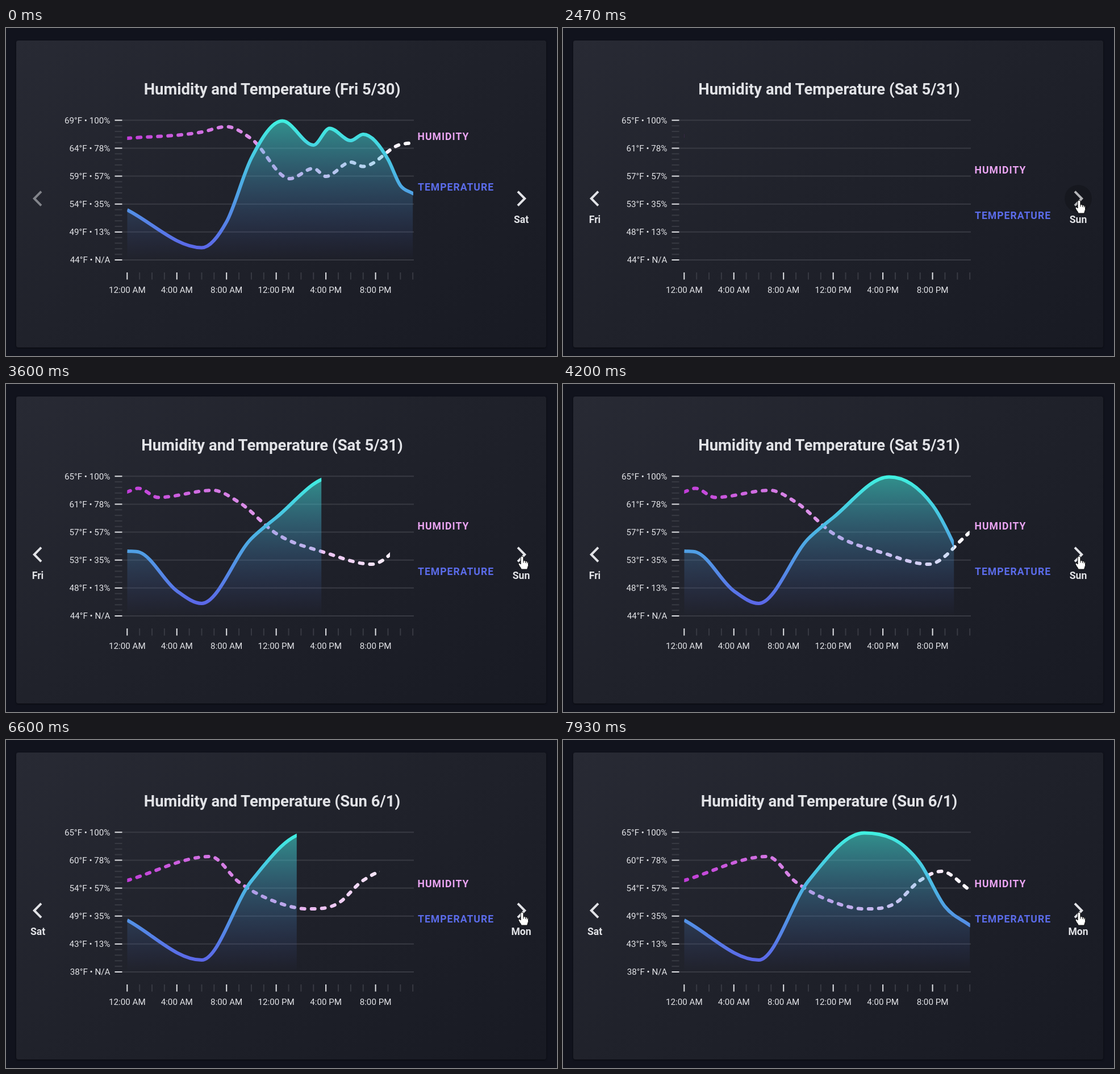
Animation of 970 by 577 pixels, one loop 8 s. Source, as an HTML page:

```html
<!DOCTYPE html>
<html lang="en">
<head>
<meta charset="utf-8">
<title>Humidity and Temperature</title>
<style>
  html, body { margin: 0; width: 100%; height: 100%; overflow: hidden; background: #11131d; }
  .card { position: absolute; left: 18px; top: 22px; width: 933px; height: 540px; border-radius: 4px;
    background: linear-gradient(145deg, #282a34, #20222b 45%, #181a23); box-shadow: 0 1px 3px #0008; }
  svg { position: absolute; left: 0; top: 0; width: 970px; height: 577px;
    font-family: Roboto, sans-serif; fill: #e2e3e7; }
  .title { font-size: 27.5px; font-weight: 700; text-anchor: middle; }
  .axis { font-size: 15.2px; }
  .series { font-size: 17.6px; font-weight: 700; letter-spacing: 1px; }
  .nav { font-size: 17.6px; font-weight: 700; text-anchor: middle; }
  .major { stroke: #e2e3e7; stroke-width: 2; }
  .minor { stroke: #383a43; stroke-width: 2; }
  .chevron { fill: none; stroke: #e2e3e7; stroke-width: 4; }
</style>
</head>
<body>
<div class="card"></div>
<svg viewBox="0 0 970 577">
  <defs>
    <linearGradient id="pink" gradientUnits="userSpaceOnUse" x1="213" x2="717" y1="0" y2="0">
      <stop stop-color="#c13cd8"/><stop offset="1" stop-color="#fff"/>
    </linearGradient>
    <linearGradient id="blue" gradientUnits="userSpaceOnUse" x1="0" x2="0" y1="162" y2="388">
      <stop stop-color="#40f0e0"/><stop offset="1" stop-color="#5b67e8"/>
    </linearGradient>
    <linearGradient id="haze" gradientUnits="userSpaceOnUse" x1="0" x2="0" y1="162" y2="408">
      <stop stop-color="#40f0e0" stop-opacity=".54"/><stop offset="1" stop-color="#5b67e8" stop-opacity="0"/>
    </linearGradient>
    <clipPath id="humidClip"><rect id="humidRect" x="213.3" y="150" height="262"/></clipPath>
    <clipPath id="tempClip"><rect id="tempRect" x="213.3" y="150" height="262"/></clipPath>
  </defs>
  <g id="axes"></g>
  <g id="chart"></g>
  <path class="chevron" d="M901 287.7L913.2 300L901 312.3"/>
  <circle id="ripple" cx="907" cy="300" r="24" fill="#000"/>
  <g id="cursor" fill="#fff" stroke="#111" stroke-width="1" stroke-linejoin="round">
    <path id="arrow" d="M0 0V17L4 13.2L6.6 19.2L9.4 18L6.8 12.2H12.2Z"/>
    <g id="hand">
      <path d="M-2.4 2.2Q-2.2 0 0 0T2.4 2.2V8Q4.2 7 6 8.6Q7.6 8 8.8 9.6Q11 9.4 11 12V16.5L9 23H-1.2Q-2 20.5 -4.4 17.6L-6.4 14Q-6.6 11.8 -4.6 12Q-3.4 12.4 -2.4 14Z"/>
      <path d="M2.4 8V11.5M6 8.6V12M8.8 9.6V12.5" fill="none"/>
    </g>
  </g>
</svg>
<script>
const LOOP = 8000, FRAME = 1000 / 15, DRAW = 2000, TEMP_DELAY = 503;
const LEFT = 213.3, HOUR = 21.865, TOP = 162.3, BOTTOM = 408, WIDTH = 503.6;
const $ = id => document.getElementById(id);

// Curves are given by their turning points as [hour, y]; "from" is the click, "start" the first stroke.
const days = [
  { from: 0, start: -LOOP, date: "Fri 5/30", next: "Sat", high: 69, low: 44,
    humid: [[0, 194], [6, 183], [8, 173.5], [10, 195], [13.1, 265], [15, 247],
      [16, 261], [18, 236], [19, 243.5], [22, 205], [23, 202]],
    temp: [[0, 320], [6, 386.5], [8, 341], [10, 229], [12.5, 163.5], [15, 206],
      [16.3, 176.5], [18, 198], [19, 187], [21, 231], [22, 277], [23, 291]] },
  { from: 2467, start: 2467, date: "Sat 5/31", prev: "Fri", next: "Sun", high: 65.4, low: 43.9,
    humid: [[0, 190], [0.9, 183.5], [2.5, 199.5], [6.9, 187], [9, 208], [12, 263],
      [16, 297], [19.7, 317], [23, 261]],
    temp: [[0, 294], [1, 296], [4, 364], [6, 386], [10, 272], [12, 235],
      [16.5, 163.5], [20, 213], [23, 341]] },
  { from: 5533, start: 5580, date: "Sun 6/1", prev: "Sat", next: "Mon", high: 65, low: 38,
    humid: [[0, 247], [6.7, 205], [9, 250], [12, 285], [14.5, 297], [17, 287],
      [19, 247], [20.7, 231], [23, 264]],
    temp: [[0, 317], [6, 387], [10, 248], [14.5, 163.5], [19, 217], [21, 293], [23, 326]] },
];

const mix = (a, b, f) => a + (b - a) * f;
const clamp = x => Math.max(0, Math.min(1, x));
const easeOut = x => 1 - (1 - clamp(x)) ** 3;
const gridY = k => mix(TOP, BOTTOM, k / 5);
const line = (x1, y1, x2, y2, cls) => `<path class="${cls}" d="M${x1} ${y1}L${x2} ${y2}"/>`;
const text = (x, y, str, cls, attrs = "") => `<text x="${x}" y="${y}" class="${cls}" ${attrs}>${str}</text>`;

function drawAxes() {
  let out = "";
  for (let i = 0; i <= 25; i++) {
    const y = gridY(i / 5), major = i % 5 === 0;
    if (major) out += line(204.5, y, 718, y, "minor");
    out += line(191.5, y, 204.5, y, major ? "major" : "minor");
  }
  for (let hour = 0; hour < 24; hour++) {
    const x = LEFT + hour * HOUR, major = hour % 4 === 0;
    out += line(x, 430, x, 442.5, major ? "major" : "minor");
    const label = `${hour % 12 || 12}:00 ${hour < 12 ? "AM" : "PM"}`;
    if (major) out += text(x, 466, label, "axis", 'text-anchor="middle"');
  }
  return out;
}

// Cubic curve through the points, level at every peak and valley.
function curve(points) {
  const last = points.length - 1;
  const span = i => points[i + 1][0] - points[i][0];
  const slope = i => (points[i + 1][1] - points[i][1]) / span(i);
  const tangent = i => {
    if (i === 0) return slope(0);
    if (i === last) return slope(last - 1);
    const before = slope(i - 1), after = slope(i);
    return before * after <= 0 ? 0
      : (before * span(i) + after * span(i - 1)) / (span(i) + span(i - 1));
  };
  const at = (hour, y) => `${LEFT + hour * HOUR} ${y} `;
  let d = "M" + at(...points[0]);
  for (let i = 0; i < last; i++) {
    const [h0, y0] = points[i], [h1, y1] = points[i + 1], third = span(i) / 3;
    d += "C" + at(h0 + third, y0 + tangent(i) * third)
      + at(h1 - third, y1 - tangent(i + 1) * third) + at(h1, y1);
  }
  return d;
}

function drawScale({ high, low }) {
  let out = "";
  for (let k = 0; k <= 5; k++) {
    const percent = k < 5 ? Math.round(100 - 21.7 * k) + "%" : "N/A";
    const label = `${Math.round(mix(high, low, k / 5))}°F • ${percent}`;
    out += text(183.5, gridY(k) + 5.4, label, "axis", 'text-anchor="end"');
  }
  return out;
}

function drawDay(day) {
  const temp = curve(day.temp);
  const labelY = points => points.at(-1)[1] - 4.8;
  return text(468.5, 117, `Humidity and Temperature (${day.date})`, "title")
    + drawScale(day)
    + `<g fill="none" stroke-width="6">
        <path d="${curve(day.humid)}" stroke="url(#pink)" stroke-dasharray="6 12"
          stroke-linecap="round" clip-path="url(#humidClip)"/>
        <g clip-path="url(#tempClip)">
          <path d="${temp}V${BOTTOM}H${LEFT}Z" fill="url(#haze)"/>
          <path d="${temp}l3 1" stroke="url(#blue)"/>
        </g>
      </g>`
    + text(724.5, labelY(day.humid), "HUMIDITY", "series", 'fill="#eaa4f2"')
    + text(725, labelY(day.temp), "TEMPERATURE", "series", 'fill="#5b6cea"')
    + `<path class="chevron" d="M62 287.7L49.8 300L62 312.3" opacity="${day.prev ? 1 : 0.5}"/>`
    + text(56, 342.5, day.prev || "", "nav") + text(907, 342.5, day.next, "nav");
}

// The pointer sweeps in from the right edge and turns into a hand over the button.
function placeCursor(t) {
  const travel = easeOut((t - 300) / 830);
  const x = mix(968, 908.5, travel) - 12 * Math.sin(Math.PI * travel), y = mix(548, 303, travel);
  $("cursor").setAttribute("transform", `translate(${x} ${y})`);
  $("cursor").style.display = travel > 0 ? "" : "none";
  $("arrow").style.display = y < 325 ? "none" : "";
  $("hand").style.display = y < 325 ? "" : "none";
}

const views = days.map(drawDay);
let shown = -1;
$("axes").innerHTML = drawAxes();

function render() {
  // The picture advances in steps of 1/15 s.
  const t = Math.floor((performance.now() % LOOP + 4) / FRAME) * FRAME % LOOP + 0.5;
  const index = days.findLastIndex(day => t >= day.from), day = days[index];
  if (index !== shown) {
    $("chart").innerHTML = views[index];
    shown = index;
  }
  const elapsed = t - day.start;
  $("humidRect").setAttribute("width", WIDTH * easeOut(elapsed / DRAW));
  $("tempRect").setAttribute("width", WIDTH * easeOut((elapsed - TEMP_DELAY) / DRAW));
  $("ripple").setAttribute("opacity", index ? 0.2 * clamp(1 - (t - day.from) / 800) : 0);
  placeCursor(t);
  requestAnimationFrame(render);
}
render();
</script>
</body>
</html>
```
